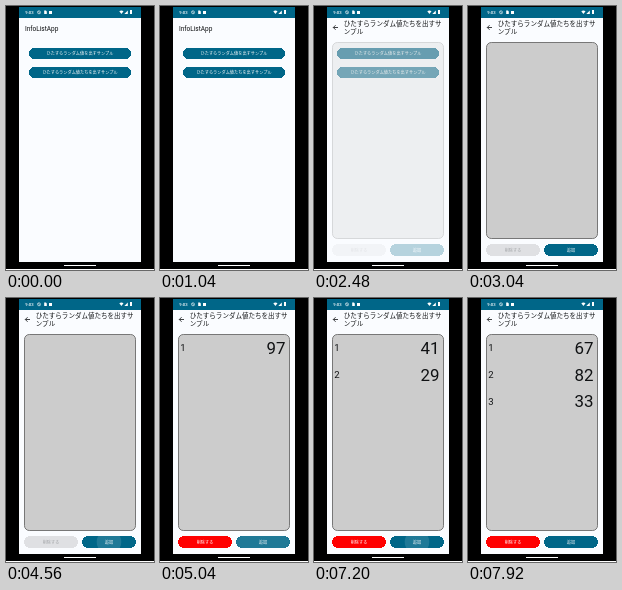
An HTML page that plays this animation: 148 px wide and 264 px high, repeating every 8000 ms.

```html
<!DOCTYPE html>
<html lang="ja">
<head>
<meta charset="utf-8">
<title>InfoListApp</title>
<style>
html, body { margin: 0; width: 100%; height: 100%; overflow: hidden; background: #000; }
svg { display: block; width: 100vw; height: 100vh; }
rect { shape-rendering: crispEdges; }
text { font-family: Roboto, "Noto Sans CJK JP", "Noto Sans CJK", sans-serif; fill: #101214; }
.title { font-size: 6.53px; }
.label { font-size: 4.16px; font-weight: 500; letter-spacing: .03px; text-anchor: middle; fill: #fff; }
.index { font-size: 9.5px; }
.value { font-size: 16.9px; letter-spacing: -.07px; text-anchor: end; }
</style>
</head>
<body>
<svg viewBox="0 0 148 264">
  <defs>
    <clipPath id="addClip"><rect x="76" y="238" width="54" height="12" rx="6"/></clipPath>
    <clipPath id="itemClip"><rect x="23" y="61" width="102" height="11" rx="5.5"/></clipPath>
  </defs>
  <rect width="148" height="264"/>
  <rect y="263" width="148" height="1" fill="#fff"/>
  <rect x="13" y="1" width="122" height="255" fill="#fafcff"/>
  <rect x="13" y="1" width="122" height="11" fill="#006688"/>
  <rect x="58" y="259" width="32" height="1" fill="#fff"/>

  <g fill="#fff">
    <text x="19.3" y="8" font-size="4.2" font-weight="500" style="fill:#fff">9:03</text>
    <circle cx="33" cy="6.3" r="1.5" fill="none" stroke="#fff" stroke-width=".6"/>
    <path d="M32 5.3l2 2" stroke="#fff" stroke-width=".6"/>
    <path d="M38.2 4.6h1.7l.9.9v2.6h-2.6z"/>
    <rect x="43" y="5" width="3" height="3"/>
    <path d="M113.3 5.2q2.1-1.6 4.2 0l-2.1 2.8z"/>
    <path d="M121.8 4.5v3.5h-3.5z"/>
    <rect x="124" y="4" width="2" height="4"/>
  </g>

  <text id="homeTitle" class="title" x="18.9" y="24.6">InfoListApp</text>
  <g id="detailTitle">
    <path d="M24 21.5h-4.6m2.2-2.3l-2.3 2.3 2.3 2.3" fill="none" stroke="#101214" stroke-width=".8"/>
    <text class="title" x="29.8" y="20.2">ひたすらランダム値たちを出すサ</text>
    <text class="title" x="29.8" y="28.2">ンプル</text>
  </g>

  <g id="home">
    <rect x="23" y="42" width="102" height="11" rx="5.5" fill="#006688"/>
    <text class="label" x="74" y="49.4">ひたすらランダム値を出すサンプル</text>
    <rect x="23" y="61" width="102" height="11" rx="5.5" fill="#006688"/>
    <circle id="itemRipple" cx="74" cy="66.5" fill="#fff" clip-path="url(#itemClip)"/>
    <text class="label" x="74" y="68.3">ひたすらランダム値たちを出すサンプル</text>
  </g>

  <g id="detail">
    <rect x="13" y="33" width="122" height="223" fill="#fafcff"/>
    <rect x="18.5" y="36.5" width="111" height="196" rx="4.8" fill="#ccc" stroke="#777"
      style="shape-rendering:auto"/>
    <g id="rows"></g>
    <rect id="clear" x="18" y="238" width="54" height="12" rx="6"/>
    <text id="clearLabel" class="label" x="45" y="245.6">削除する</text>
    <rect x="76" y="238" width="54" height="12" rx="6" fill="#006688"/>
    <circle id="addRipple" cx="103" cy="244" fill="#fff" clip-path="url(#addClip)"/>
    <text class="label" x="103" y="245.6">追加</text>
  </g>
</svg>
<script>
const LOOP = 8000, STEP = 80;
const OPEN = 2160, FADE_START = 2310, FADE_TIME = 650;

// Each row: [time, value] pairs; the first one is when the row appears.
const ROWS = [
  [[4640, 38], [5040, 97], [5520, 24], [5920, 100], [6320, 53], [6720, 89], [7200, 41], [7600, 67]],
  [[5760, 15], [6000, 61], [6400, 47], [6880, 29], [7360, 70], [7760, 82]],
  [[7280, 56], [7760, 33]]
];
// Presses of the add button: [down, fade begins, fade ends]
const PRESSES = [[4560, 5040, 5240], [5680, 6080, 6480], [7200, 7520, 7900]];

const $ = id => document.getElementById(id);
const clamp = x => Math.min(1, Math.max(0, x));
const progress = (t, from, to) => clamp((t - from) / (to - from));
const show = (el, on) => el.setAttribute('visibility', on ? 'visible' : 'hidden');

// cubic-bezier(.4, 0, .2, 1)
function ease(x) {
  let lo = 0, hi = 1;
  for (let i = 0; i < 24; i++) {
    const u = (lo + hi) / 2, v = 1 - u;
    if (1.2 * v * v * u + .6 * v * u * u + u * u * u < x) lo = u; else hi = u;
  }
  return lo * lo * (3 - 2 * lo);
}

function addText(cls, x, y) {
  const el = document.createElementNS('http://www.w3.org/2000/svg', 'text');
  el.setAttribute('class', cls);
  el.setAttribute('x', x);
  el.setAttribute('y', y);
  $('rows').append(el);
  return el;
}

const rowViews = ROWS.map((_, i) => {
  const index = addText('index', 20.3, 53.4 + i * 26.7);
  index.textContent = i + 1;
  return { index, value: addText('value', 125.4, 56 + i * 26.7) };
});

function ripple(el, t, [down, fade, end], reach) {
  const on = t >= down && t < end;
  el.setAttribute('r', on ? 4 + reach * progress(t, down - STEP, down + 160) : 0);
  el.setAttribute('opacity', .12 * (1 - progress(t, fade, end)));
}

function draw(t) {
  const opened = t >= OPEN;
  const mix = ease(progress(t, FADE_START, FADE_START + FADE_TIME));
  show($('homeTitle'), !opened);
  show($('detailTitle'), opened);
  $('home').setAttribute('opacity', 1 - mix);
  $('detail').setAttribute('opacity', mix);
  ripple($('itemRipple'), t, [OPEN, 2400, 2880], 50);

  const press = PRESSES.filter(p => t >= p[0]).pop() || PRESSES[0];
  ripple($('addRipple'), t, press, 25);

  const active = t >= ROWS[0][0][0];
  $('clear').setAttribute('fill', active ? '#f00' : '#dfe0e3');
  $('clearLabel').style.fill = active ? '#fff' : '#a3a5a8';

  rowViews.forEach((view, i) => {
    const current = ROWS[i].filter(c => t >= c[0]).pop();
    show(view.index, current);
    view.value.textContent = current ? current[1] : '';
  });
}

const start = performance.now();
function frame() {
  const t = (performance.now() - start) % LOOP;
  draw(Math.floor(t / STEP) * STEP);
  requestAnimationFrame(frame);
}
draw(0);
requestAnimationFrame(frame);
</script>
</body>
</html>
```
